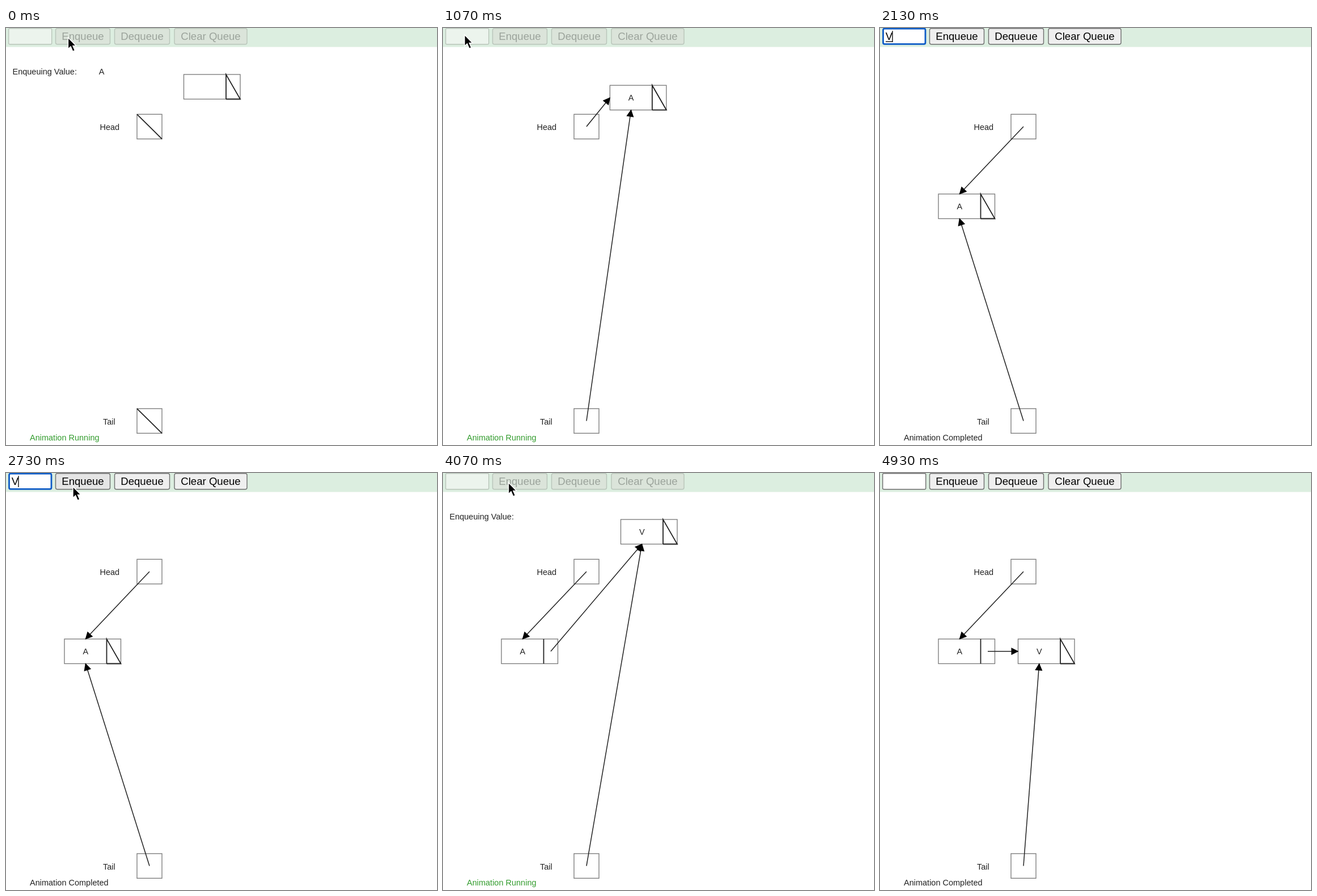
An HTML page for the animation above (5070 ms loop, 760 px wide and 736 px high).

```html
<!DOCTYPE html>
<html lang="en">
<head>
<meta charset="utf-8">
<title>Linked list queue</title>
<style>
html, body { margin: 0; width: 100%; height: 100%; overflow: hidden; background: #fff; }
svg { display: block; }
text { font: 14.5px "Liberation Sans", Arial, sans-serif; fill: #222; }
text.ui { font-size: 18.6px; fill: #000; }
text.off { fill: #9ba39b; }
.mid { text-anchor: middle; }
.box { fill: #fff; stroke: #777; stroke-width: 1.3; }
.ink { fill: none; stroke: #222; stroke-width: 1.8; }
.link { stroke: #222; stroke-width: 1.5; }
</style>
</head>
<body>
<svg id="stage" width="760" height="736" viewBox="0 0 760 736"></svg>
<script>
const stage = document.getElementById('stage');
const LOOP = 5070, FPS = 15;
const HEAD = [253, 174], TAIL = [253, 693.5];
const NEW = [313.5, 82], SLOT_A = [103, 293], SLOT_V = [243.5, 293];
const W = 99.5, H = 43.5, CELL = 74.5;

// pointer path: tick, x, y
const PATH = [
  [2, 109.5, 17], [9, 36.5, 18], [12, 36.5, 18], [14, 38, 12], [33, 38, 12],
  [34, 44, 30], [37, 66, 66], [41, 118, 24], [48, 115.5, 17], [66, 115.5, 17],
  [67, 122, 32], [68, 200, 150], [70, 537, 650]
];

const clamp = v => Math.max(0, Math.min(1, v));
const mix = (a, b, p) => [a[0] + (b[0] - a[0]) * p, a[1] + (b[1] - a[1]) * p];
const move = (a, b, k, start) => mix(a, b, clamp((k - start) / 5.5));
const text = (s, x, y, cls = '', style = '') =>
  `<text x="${x}" y="${y}" class="${cls}" style="${style}">${s}</text>`;
const rect = (x, y, w, h, attrs) =>
  `<rect x="${x}" y="${y}" width="${w}" height="${h}" ${attrs}/>`;

function pointerAt(k) {
  const i = PATH.findIndex(p => p[0] >= k);
  if (i < 1) return PATH[i < 0 ? PATH.length - 1 : 0].slice(1);
  const a = PATH[i - 1], b = PATH[i];
  return mix(a.slice(1), b.slice(1), (k - a[0]) / (b[0] - a[0]));
}

// where a link from a point meets a node
function anchor([fx, fy], [x, y]) {
  const dx = Math.max(x - fx, fx - x - W, 0), dy = Math.max(y - fy, fy - y - H, 0);
  if (dy > dx) return [x + CELL / 2, fy < y ? y : y + H];
  return [dx ? (fx < x ? x : x + W) : x + CELL / 2, y + H / 2];
}

function link(from, node) {
  const [x, y] = anchor(from, node);
  const angle = Math.atan2(y - from[1], x - from[0]) * 180 / Math.PI;
  return `<path class="link" d="M${from}L${x},${y}"/>
    <path d="M1,0L-12,-6.6V6.6Z" transform="translate(${x},${y}) rotate(${angle})"/>`;
}

function node([x, y], label, last) {
  const slash = last ? `L${x + W},${y + H}H${x + CELL}` : '';
  return rect(x, y, W, H, 'class="box"') +
    `<path class="ink" d="M${x + CELL},${y + H}V${y}${slash}"/>` +
    text(label, x + CELL / 2, y + 27, 'mid');
}

function endBox([x, y], empty) {
  return rect(x - 22, y - 21.7, 44, H, 'class="box"') +
    (empty ? `<path class="ink" d="M${x - 22},${y - 21.7}l44,${H}"/>` : '');
}

function toolbar(k, running, focus) {
  const button = (s, x, w) => {
    const hover = s === 'Enqueue' && k > 40 && k < 44;
    const fill = running ? '#dbe4da' : hover ? '#e5e5e5' : '#efefef';
    return rect(x, .7, w, 28, `rx="3" fill="${fill}" stroke="${running ? '#b9c5ba' : '#6e6e6e'}" stroke-width="1.4"`) +
      text(s, x + w / 2, 21, 'ui mid' + (running ? ' off' : ''));
  };
  let out = rect(0, 0, 760, 33.5, 'fill="#dceee0"');
  out += focus
    ? rect(5.5, 1, 74.5, 27.3, 'rx="2.5" fill="#fff" stroke="#0d5bc6" stroke-width="2.8"')
    : rect(4.7, .7, 76, 28, `rx="2" fill="${running ? '#ecf4ed' : '#fff'}" stroke="${running ? '#b9c5ba' : '#6e6e6e'}" stroke-width="1.4"`);
  if (focus) {
    const typed = k >= 32;
    if (typed) out += text('V', 9.7, 21, 'ui');
    if (k >= 32 && k < 34) out += rect(10, 23.3, 12, 1.4, 'fill="#111"');
    out += rect(typed ? 21.3 : 10, 5, 1.4, 20, 'fill="#111"');
  }
  return out + button('Enqueue', 87.5, 96) + button('Dequeue', 191.5, 97) + button('Clear Queue', 297, 128);
}

function pointer(k) {
  if (k >= 71 || (k >= 32 && k < 34)) return '';
  if (k >= 22 && k < 32)
    return '<path d="M35,8q3,0 3,3v13q0,3 -3,3M41,8q-3,0 -3,3M38,24q0,3 3,3" fill="none" stroke="#222" stroke-width="1.4"/>';
  return `<path transform="translate(${pointerAt(k)})" stroke="#fff" stroke-width="1.4"
    d="M0,0V20L4.6,15.8L8.2,24.2L12,22.6L8.4,14.4H14.2Z"/>`;
}

function draw(k) {
  const second = k >= 44;
  const running = k < 22 || (second && k < 73);
  const a = move(NEW, SLOT_A, k, 15.5), v = move(NEW, SLOT_V, k, 66.5);
  const linked = k >= 11, joined = k >= 55;
  let out = toolbar(k, running, k >= 23 && !second);

  if (k < 16 || (second && k < 67)) out += text('Enqueuing Value:', 11.5, 81.5);
  out += text('Head', 165.5, 180) + text('Tail', 171, 699.5);
  out += text(running ? 'Animation Running' : 'Animation Completed', 42, 728, '',
    running ? 'fill:#339c2e' : '');

  out += endBox(HEAD, !linked) + endBox(TAIL, !linked);
  out += node(a, linked ? 'A' : '', !joined);
  if (second) out += node(v, joined ? 'V' : '', true);

  if (linked) out += link(HEAD, a) + link(TAIL, k >= 61 ? v : a);
  if (joined) out += link([a[0] + 87, a[1] + H / 2], v);

  if (!linked || (second && !joined)) {
    const [x, y] = move([168.5, 81.5], [NEW[0] + CELL / 2, NEW[1] + 27], k, second ? 49.5 : 4.5);
    out += text(second ? 'V' : 'A', x, y, 'mid');
  }
  stage.innerHTML = out + pointer(k);
}

let shown = -1;
function tick() {
  let k = Math.floor((performance.now() % LOOP + 5) * FPS / 1000);
  if (k === 69) k = 68; // short stall
  k = Math.min(k, 75);
  if (k !== shown) draw(shown = k);
  requestAnimationFrame(tick);
}
tick();
</script>
</body>
</html>
```
